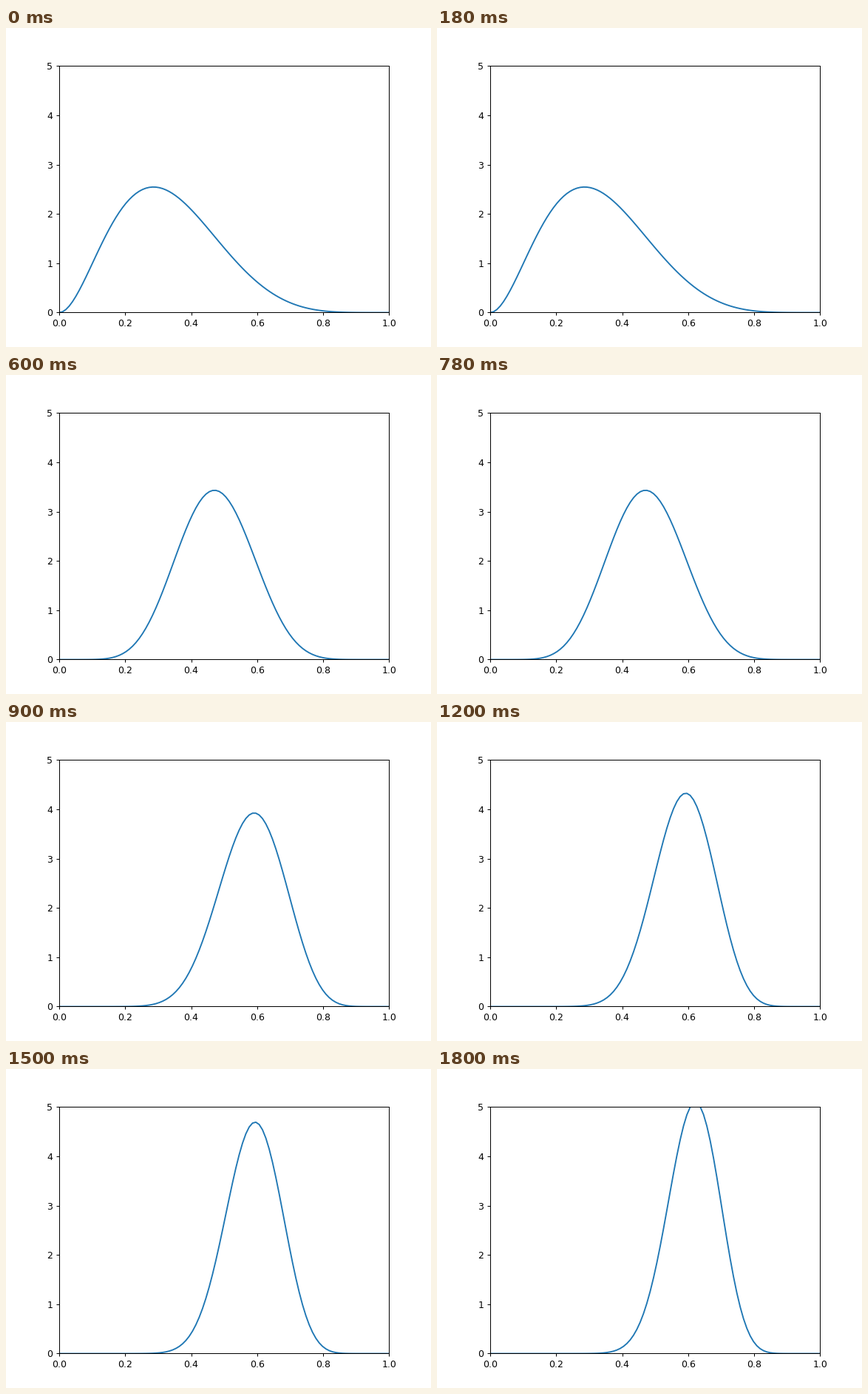
Write a matplotlib script that moves like this. It is 575x431 px and loops after 2.1 s.

```python
from math import comb

import matplotlib.pyplot as plt
import numpy as np
from matplotlib.animation import FuncAnimation

W, H, DPI = 575, 431, 90
LEFT, RIGHT = 72, 518.4
TOP, BASE = 51.49, 384.48
UNIT = 66.528  # pixels per unit of density
Y_MAX = (BASE - TOP) / UNIT

# Successes counted so far; every step adds five trials to the first seven.
HITS = [2, 5, 8, 13, 16, 19, 23]
x = np.linspace(0, 1, 100)


def posterior(step):
    """Beta density for a success rate under a uniform prior."""
    k, n = HITS[step], 7 + 5 * step
    return (n + 1) * comb(n, k) * x**k * (1 - x) ** (n - k)


fig = plt.figure(figsize=(W / DPI, H / DPI), dpi=DPI, facecolor="white")
ax = fig.add_axes([LEFT / W, 1 - BASE / H, (RIGHT - LEFT) / W, (BASE - TOP) / H])
ax.set_xlim(0, 1)
ax.set_ylim(0, Y_MAX)
ax.set_yticks([0, 1, 2, 3, 4, Y_MAX], labels=range(6))
(curve,) = ax.plot(x, posterior(0), color="C0", lw=1.5)


def update(step):
    curve.set_ydata(posterior(step))
    return (curve,)


anim = FuncAnimation(fig, update, frames=len(HITS), interval=300,
                     repeat=True, repeat_delay=0)
plt.show()
```
